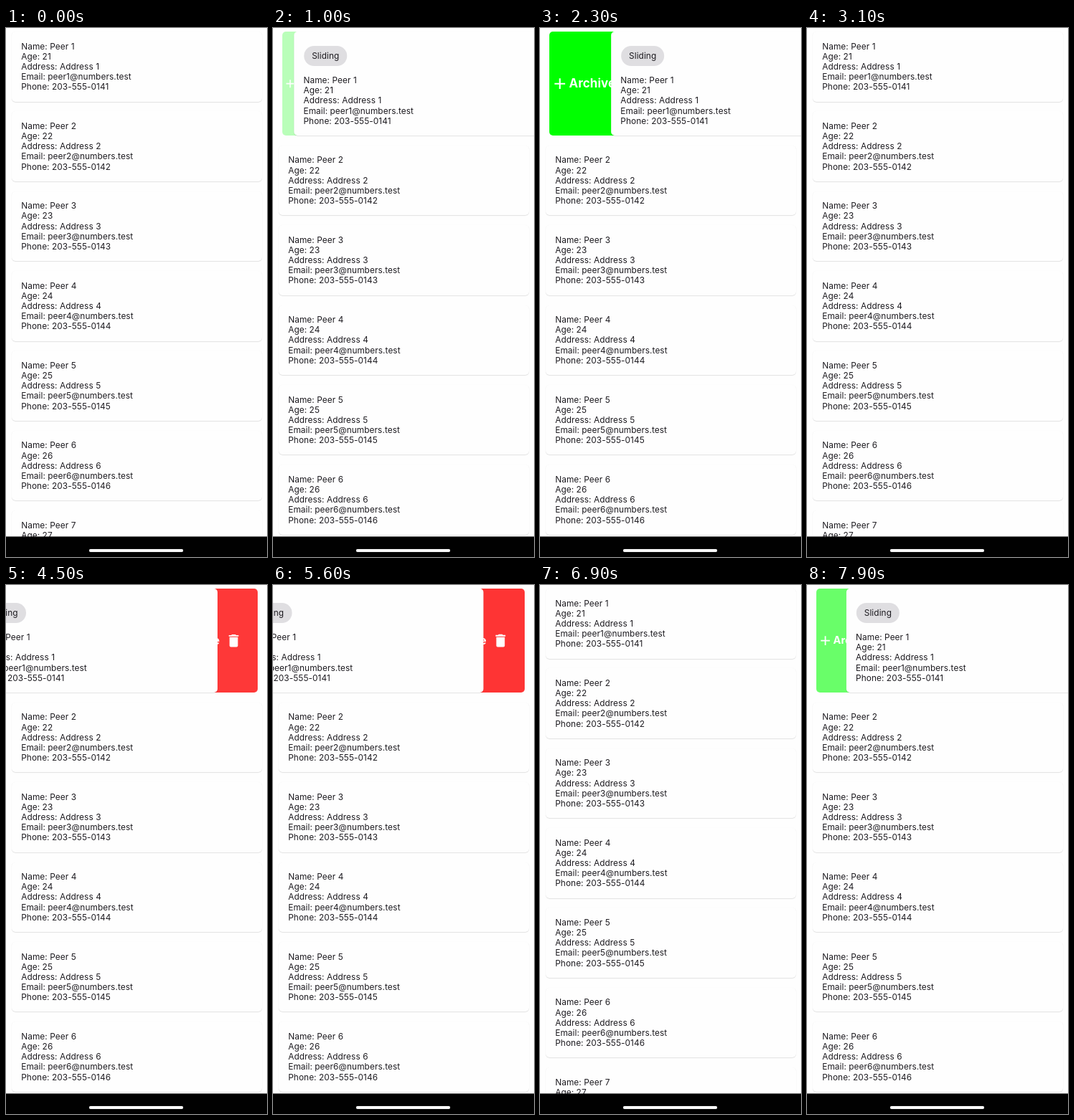
An HTML page for the animation above (8 s loop, 364x738 px).

```html
<!DOCTYPE html>
<html lang="en">
<head>
<meta charset="utf-8">
<style>
  html, body { margin: 0; width: 100%; height: 100%; overflow: hidden; background: #fefefe; }
  body { position: relative; font: 11.85px/14.15px Inter, Roboto, sans-serif; letter-spacing: .07px; color: #1d1b20; }
  body * { position: absolute; box-sizing: border-box; white-space: pre; }
  .card {
    left: 8px; width: 348.5px; height: 97.6px; border-radius: 5px; background: #fefefe;
    box-shadow: 0 .8px 1px rgba(0,0,0,.1), 0 .5px 1.5px rgba(0,0,0,.06);
  }
  .card p { margin: 0; left: 13.2px; bottom: 13.2px; }
  .chip {
    top: 20.3px; width: 60px; height: 28px; border-radius: 14px;
    background: #dfdee1; line-height: 28px; text-align: center;
  }
  .pane { left: 13px; top: 5px; width: 338px; height: 145px; border-radius: 5px; color: #fff; overflow: hidden; }
  .pane div { inset: 0; font: 700 16.9px/145px Inter, Roboto, sans-serif; }
  .pane svg { width: 25.4px; height: 25.4px; top: 59.8px; fill: #fff; }
  #archive { background: #0f0; }
  #archive div { transform-origin: left; }
  #archive svg { left: 1.8px; }
  #archive span { left: 27.6px; }
  #remove { background: #f00; }
  #remove div { transform-origin: right; }
  #remove svg { right: 23.3px; }
  #remove span { right: 57.5px; }
  #bar { left: 0; top: 709px; width: 100%; height: 29px; background: linear-gradient(#0008 1px, #010101 1px); }
  #bar i {
    left: 116px; top: 18px; width: 131px; height: 4px; border-radius: 2px;
    background: #fff; box-shadow: 0 0 1px rgba(255,255,255,.6);
  }
</style>
</head>
<body>
<div class="pane" id="archive"><div><svg viewBox="0 0 24 24"><path d="M19 13h-6v6h-2v-6H5v-2h6V5h2v6h6z"/></svg><span>Archive</span></div></div>
<div class="pane" id="remove"><div><span>Delete</span><svg viewBox="0 0 24 24"><path d="M6 19a2 2 0 0 0 2 2h8a2 2 0 0 0 2-2V7H6zM19 4h-3.500l-1-1h-5l-1 1H5v2h14z"/></svg></div></div>
<div id="bar"><i></i></div>
<script>
const LOOP = 8000, STEP = 100, TOP = 5, PITCH = 111.35, HEIGHT = 97.6, GROW = 47.5;
const $ = id => document.getElementById(id);
const bar = $('bar');

const cards = [1, 2, 3, 4, 5, 6, 7].map(n => {
  const card = document.createElement('div');
  card.className = 'card';
  card.innerHTML = `<p>Name: Peer ${n}\nAge: ${20 + n}\nAddress: Address ${n}\n` +
    `Email: peer${n}@numbers.test\nPhone: 203-555-014${n}</p>`;
  document.body.insertBefore(card, bar);
  return card;
});
const chip = document.createElement('span');
chip.className = 'chip';
chip.textContent = 'Sliding';
cards[0].append(chip);

// Each drag is a list of [time, offset]; the card snaps home after the last point.
const drags = [
  [[900, 9], [1300, 58], [1600, 88], [1900, 94], [2600, 89], [2700, 89]],
  [[4000, -10], [4200, -36], [4500, -62], [4800, -66], [5600, -63.5], [6600, -58.5], [6900, -58.5]],
  [[7600, 9], [8000, 59.5]]
];

function offsetAt(t) {
  const drag = drags.find(d => t >= d[0][0] && t < d.at(-1)[0]);
  if (!drag) return 0;
  const i = drag.findIndex(p => p[0] > t);
  const [t0, x0] = drag[i - 1], [t1, x1] = drag[i];
  return x0 + (x1 - x0) * (t - t0) / (t1 - t0);
}

function showPane(id, pull) {
  const p = Math.min(1, Math.max(0, pull / 80));
  $(id).style.opacity = p;
  $(id).firstChild.style.transform = `scale(${.65 + .35 * p})`;
}

function draw(now) {
  const x = offsetAt(Math.floor(now % LOOP / STEP) * STEP);
  const grow = x ? GROW : 0;
  cards.forEach((card, i) => card.style.top = TOP + i * PITCH + (i && grow) + 'px');
  cards[0].style.height = HEIGHT + grow + 'px';
  cards[0].style.transform = `translateX(${x}px)`;
  chip.style.display = x ? 'block' : 'none';
  chip.style.left = (x < 0 ? 21.5 : 14) + 'px';
  showPane('archive', x);
  showPane('remove', -x);
}

const start = performance.now();
function tick() {
  draw(performance.now() - start);
  requestAnimationFrame(tick);
}
tick();
</script>
</body>
</html>
```
